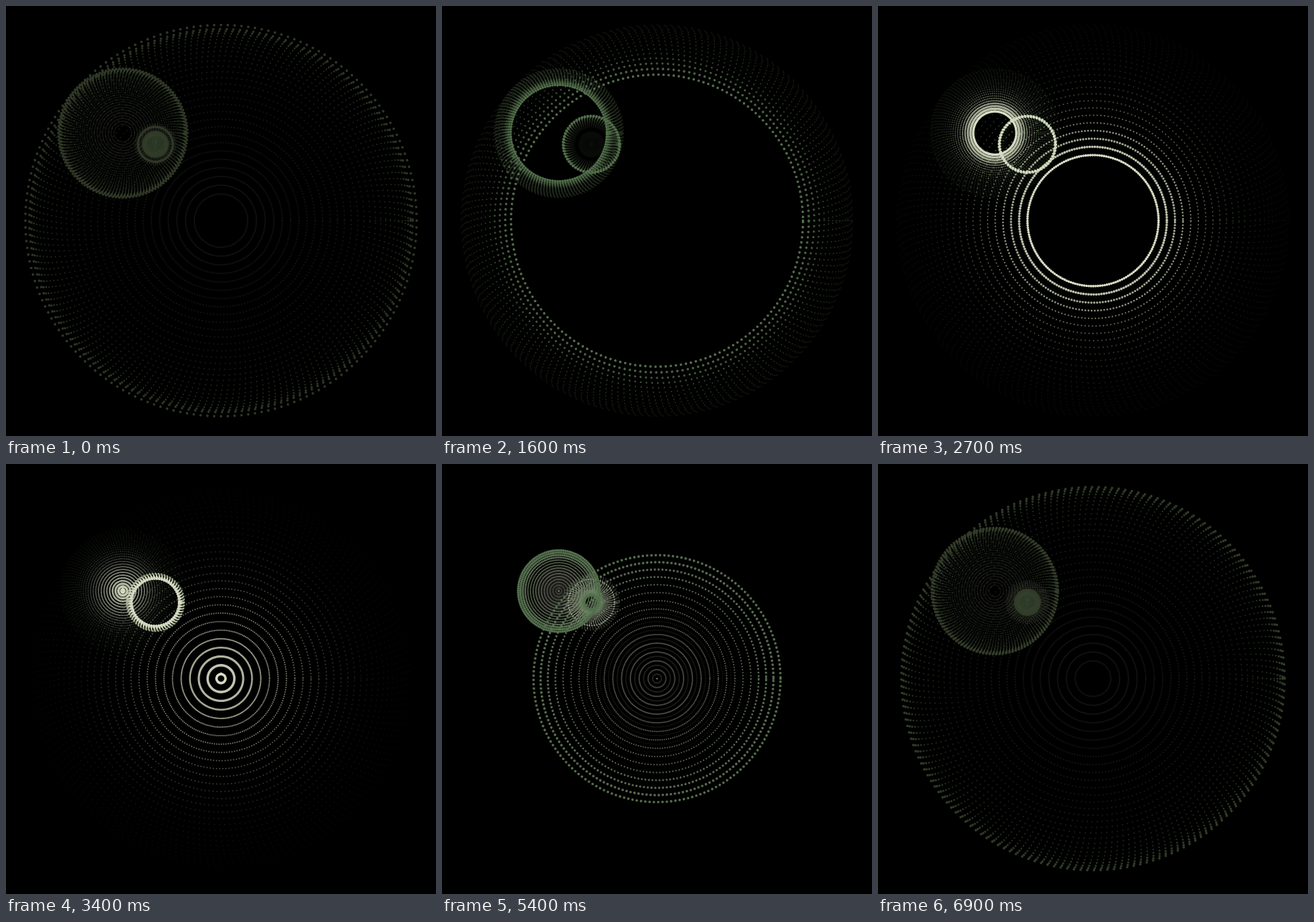
These frames come from a looping animation (600 by 600 pixels, 7 s). An HTML page with a canvas:

```html
<!DOCTYPE html>
<html lang="en">
<head>
<meta charset="utf-8">
<title>Pulsing dot rings</title>
<style>
  html, body { margin: 0; width: 100%; height: 100%; overflow: hidden; background: #000; }
  canvas { display: block; width: 600px; height: 600px; }
</style>
</head>
<body>
<canvas id="stage" width="600" height="600"></canvas>
<script>
const ctx = document.getElementById('stage').getContext('2d');
const TAU = Math.PI * 2;
const STEP = 100, STEPS = 70, TRAIL = 28, FADE = 0.91;
const TURN = TAU / 18 / STEPS;
const REST_AT = 34.5, REST = 4.5;

const rings = [
  { x: 300, y: 299.5, size: 273, dots: 180, shift: 0 },
  { x: 163, y: 177.3, size: 90, dots: 120, shift: 0 },
  { x: 208.5, y: 193, size: 40.5, dots: 60, shift: -0.927 }
];

const OLIVE = [48, 56, 38], GREEN = [82, 111, 75], CREAM = [214, 220, 194];

const clamp = (v, lo, hi) => Math.min(hi, Math.max(lo, v));
const mix = (a, b, k) => a.map((v, i) => Math.round(v + (b[i] - v) * k));

// The pulse rests for a moment when the large ring has closed
function phaseAt(step) {
  return (step - clamp(step - REST_AT, 0, REST)) / REST_AT * Math.PI / 2;
}

// Olive at both ends of the loop, through green to cream in the middle
function colorAt(step) {
  const glow = 1 - Math.abs(step / STEPS * 2 - 1);
  const color = glow < 0.46
    ? mix(OLIVE, GREEN, glow / 0.46)
    : mix(GREEN, CREAM, clamp((glow - 0.46) / 0.3, 0, 1));
  return `rgb(${color})`;
}

function addDot(x, y, r) {
  ctx.moveTo(x + r, y);
  ctx.arc(x, y, r, 0, TAU);
}

function drawRings(step, age) {
  const phase = phaseAt(step);
  const dotSize = clamp(2.1 - 0.25 * age, 1, 1.8);
  ctx.fillStyle = colorAt(step);
  ctx.globalAlpha = FADE ** age;
  for (const { x, y, size, dots, shift } of rings) {
    const r = size * Math.abs(Math.cos(phase + shift));
    ctx.beginPath();
    for (let i = 0; i < dots; i++) {
      const angle = i * TAU / dots + step * TURN;
      addDot(x + r * Math.cos(angle), y + r * Math.sin(angle), dotSize);
    }
    addDot(x + r, y, dotSize);
    ctx.fill();
  }
}

function draw(step) {
  ctx.globalAlpha = 1;
  ctx.fillStyle = '#000';
  ctx.fillRect(0, 0, 600, 600);
  for (let age = TRAIL; age >= 0; age--) {
    drawRings((step - age + STEPS) % STEPS, age);
  }
}

let shown = -1;
const start = performance.now();

function tick() {
  const step = Math.floor((performance.now() - start) / STEP) % STEPS;
  if (step !== shown) draw(shown = step);
  requestAnimationFrame(tick);
}
tick();
</script>
</body>
</html>
```
